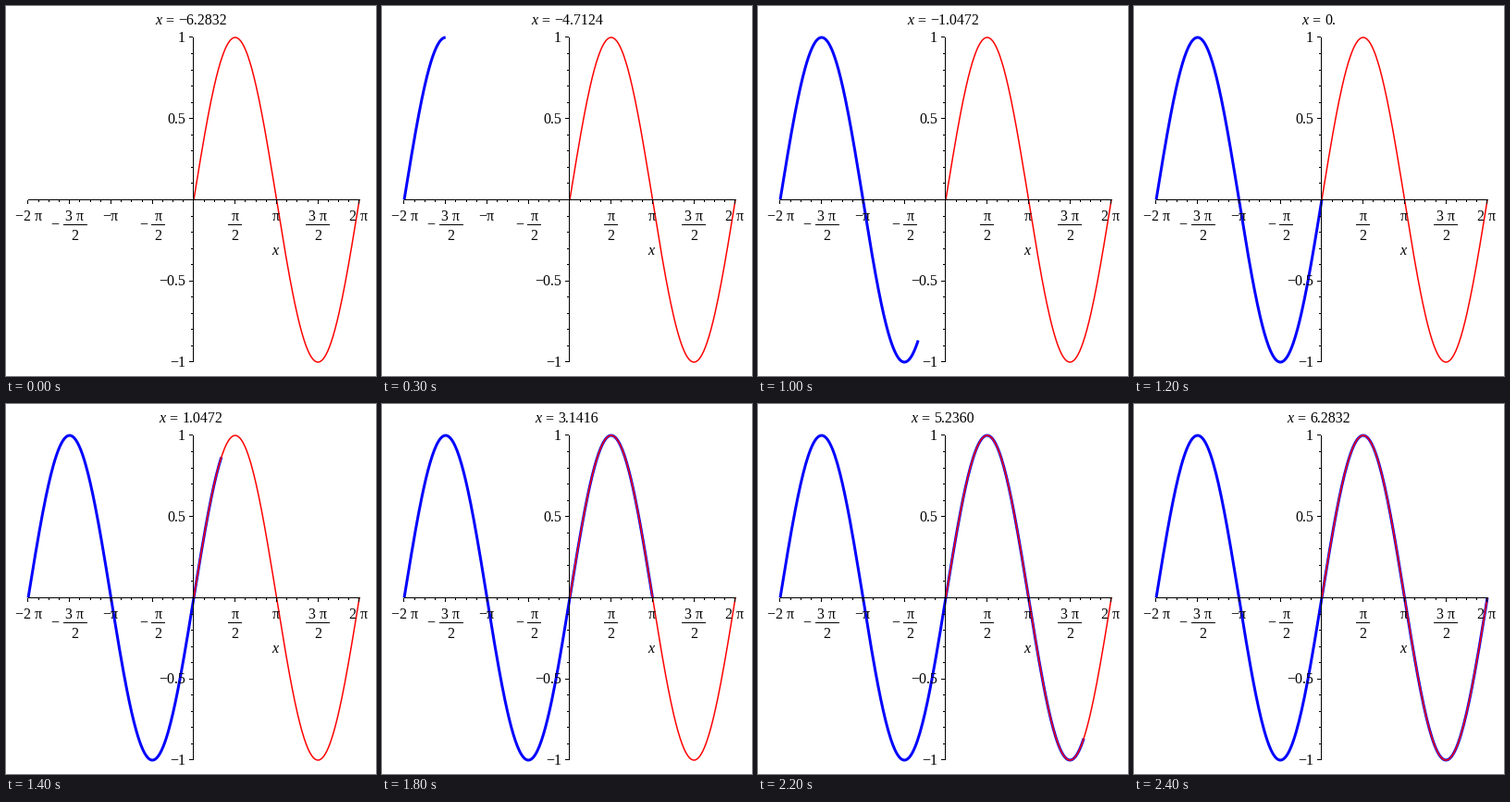
A matplotlib script that plays this animation: 400 px wide and 400 px high, repeating every 2.5 s.

```python
import numpy as np
import matplotlib.pyplot as plt
from matplotlib.animation import FuncAnimation

SIZE, DPI = 400, 100
FRAMES, STEP_MS = 25, 100
X0, Y0 = 203, 209.5             # origin in pixels
SPAN, SY = 179, 175.5           # pixels per 2π and per unit
SX = SPAN / (2 * np.pi)
PX = 72 / DPI                   # points per pixel
FONT = 16 * PX

plt.rcParams["font.family"] = "Liberation Serif"

fig = plt.figure(figsize=(SIZE / DPI, SIZE / DPI), dpi=DPI, facecolor="white")
ax = fig.add_axes([0, 0, 1, 1])
ax.set_xlim(0, SIZE)
ax.set_ylim(SIZE, 0)
ax.axis("off")


def label(x, y, s, ha="center", **kw):
    return ax.text(x, y, s, ha=ha, va="baseline", fontsize=FONT,
                   color="black", zorder=6, **kw)


def snap(c):
    """Centre of the pixel that a thin line at c falls on."""
    return np.ceil(c - 1) + 0.5


def bar(x1, x2, y1, y2):
    ax.fill_between([x1, x2], y1, y2, color="black", lw=0,
                    antialiased=False, zorder=5)


def hline(y, x1, x2):
    bar(x1, x2, snap(y) - 0.5, snap(y) + 0.5)


def vline(x, y1, y2):
    bar(snap(x) - 0.5, snap(x) + 0.5, y1, y2)


def fraction(x, top, half, minus_x=None):
    label(x, 232, top)
    hline(237, x - half, x + half)
    label(x, 253, "2")
    if minus_x is not None:
        label(minus_x, 241, "−")


def sine(a, b):
    t = np.linspace(a, b, 240)
    return X0 + SX * t, Y0 - SY * np.sin(t)


# axes and ticks
hline(Y0, 24, 383)
vline(X0, 34, 385)
for i in range(-16, 17):
    vline(X0 + i * SPAN / 16, 210, 214 if i % 4 == 0 else 212)
for i in range(-10, 11):
    if i:
        hline(Y0 - i * SY / 10, 198 if i % 5 == 0 else 200, 202)

# tick labels
for y, s in [(39, "1"), (127, "0.5"), (302, "−0.5"), (390, "−1")]:
    label(194, y, s, ha="right")
label(25, 232, "−2 π")
label(112.5, 232, "−π")
label(292, 232, "π")
label(381, 232, "2 π")
fraction(74.5, "3 π", 13, 53)
fraction(164.5, "π", 7.5, 149)
fraction(247.5, "π", 7.5)
fraction(337, "3 π", 13)
label(291, 269, "x", style="italic")

# curves
trace, = ax.plot([], [], color="#0000ff", lw=3 * PX, zorder=2,
                 solid_capstyle="butt")
ax.plot(*sine(0, 2 * np.pi), color="#ff0000", lw=1.5 * PX, zorder=3,
        solid_capstyle="butt")

# title pieces
name = label(0, 20, "x", ha="left", style="italic")
equals = label(0, 20, "=", ha="left")
value = label(0, 20, "", ha="left")


def number(x):
    s = "0." if x == 0 else f"{x:#.5g}"
    return s.replace("-", "−")


def advance(s):
    return sum({".": 4, "−": 9}.get(c, 8) for c in s)


def update(k):
    x = (k - 12) * np.pi / 6
    trace.set_data(*sine(-2 * np.pi, x))
    s = number(x)
    left = 200.5 - (26 + advance(s)) / 2
    name.set_x(left)
    equals.set_x(left + 11)
    value.set_x(left + 25)
    value.set_text(s)
    return trace, name, equals, value


anim = FuncAnimation(fig, update, frames=FRAMES, interval=STEP_MS,
                     repeat=True, repeat_delay=0, blit=False)
plt.show()
```
